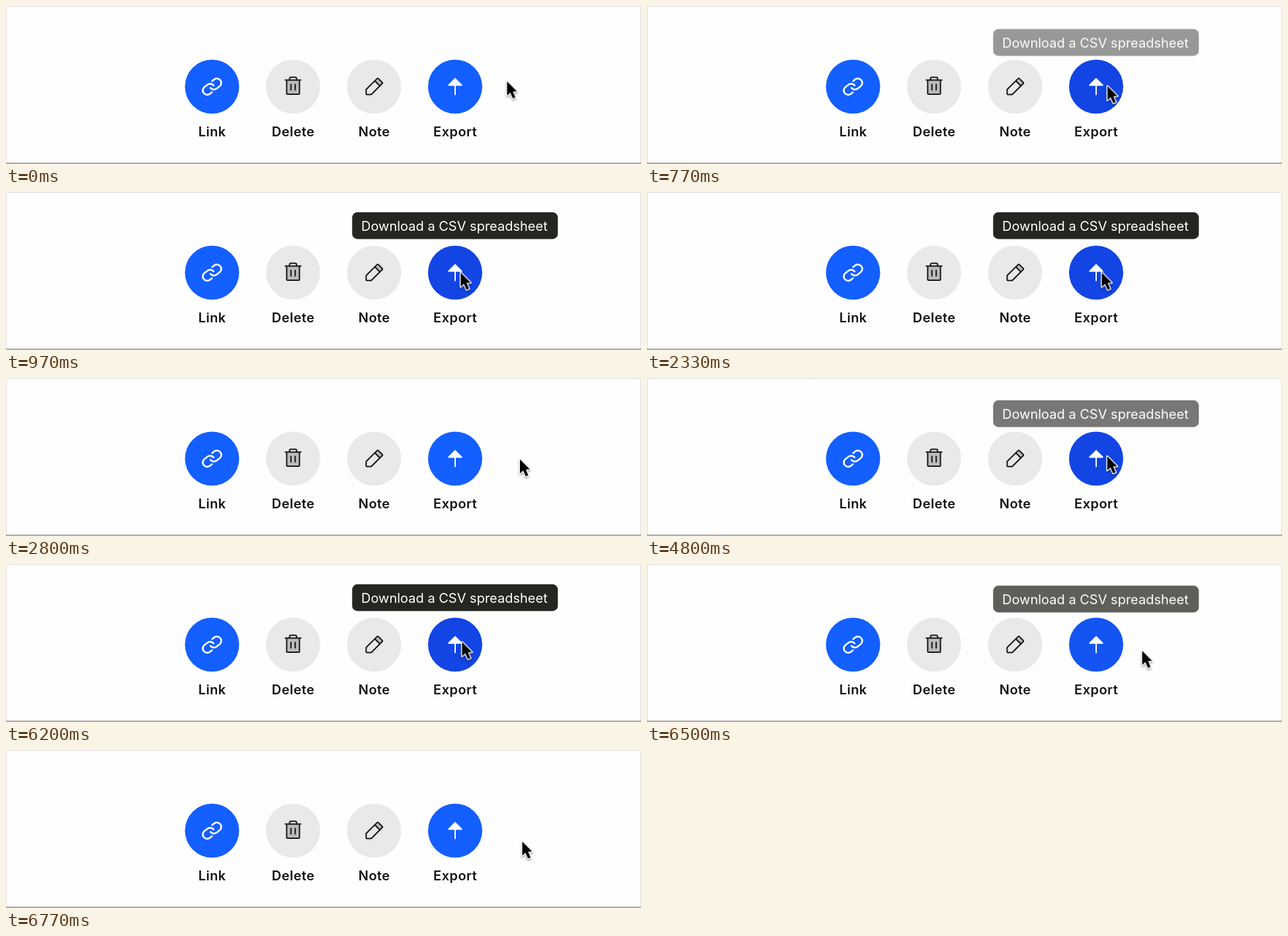
These frames come from a looping animation (960 px wide and 240 px high, 7230 ms). An HTML page:

```html
<!DOCTYPE html>
<html lang="en">
<head>
<meta charset="utf-8">
<title>Export tooltip</title>
<style>
  html, body { margin: 0; width: 100%; height: 100%; overflow: hidden; background: #fefefe; }
  svg { display: block; width: 960px; height: 240px; font-family: Inter, sans-serif; font-size: 20px; }
  .label { font-weight: 600; letter-spacing: .45px; text-anchor: middle; fill: #141414; }
  .primary { fill: #145fff; }
  .plain { fill: #e9e9e8; }
  .icon { fill: none; stroke: #171717; stroke-width: 15; stroke-linecap: round; stroke-linejoin: round; }
  .icon.light { stroke: #fff; }
  .tint { fill: #000; fill-opacity: .2; stroke: none; }
  #tip { opacity: 0; }
  #pointer { filter: drop-shadow(0 2px 1.5px rgba(0, 0, 0, .35)); }
</style>
</head>
<body>
<svg viewBox="0 0 960 240">
  <path d="M.5 240V.5H959.5V240" fill="none" stroke="#dcdcdc"/>
  <rect y="238" width="960" height="1.5" fill="#8e8e8e"/>

  <g transform="translate(311.5 122.5)">
    <circle class="primary" r="41"/>
    <g class="icon light" style="stroke-width:18" transform="rotate(7) scale(.15) translate(-128 -128)">
      <path d="M122.3 71.4l19.8-19.8a44.1 44.1 0 0 1 62.3 62.3l-28.3 28.2a43.9 43.9 0 0 1-62.2 0"/>
      <path d="M133.7 184.6l-19.8 19.8a44.1 44.1 0 0 1-62.3-62.3l28.3-28.2a43.9 43.9 0 0 1 62.2 0"/>
    </g>
    <text class="label" x=".2" y="75.5">Link</text>
  </g>

  <g transform="translate(434 122.5)">
    <circle class="plain" r="41"/>
    <g class="icon" transform="scale(.134) translate(-128 -130)">
      <path class="tint" d="M56 56H200V216H56Z"/>
      <path d="M216 56H40M104 104V168M152 104V168M200 56V208a8 8 0 0 1-8 8H64a8 8 0 0 1-8-8V56"/>
      <path d="M168 56V40a16 16 0 0 0-16-16H104a16 16 0 0 0-16 16V56"/>
    </g>
    <text class="label" x=".2" y="75.5">Delete</text>
  </g>

  <g transform="translate(556.5 122.5)">
    <circle class="plain" r="41"/>
    <g class="icon" transform="scale(.137) translate(-128 -128)">
      <path class="tint" d="M192 120L136 64L168 35L221 88Z"/>
      <path d="M96 216H48a8 8 0 0 1-8-8V163.3a8 8 0 0 1 2.3-5.6l120-120a8 8 0 0 1 11.4 0l44.6 44.6a8 8 0 0 1 0 11.4ZM136 64L192 120"/>
    </g>
    <text class="label" x=".2" y="75.5">Note</text>
  </g>

  <g transform="translate(679 122.5)">
    <circle id="export" class="primary" r="41"/>
    <path d="M0-12L9.7-2.3H-9.7ZM0-3V12" fill="#fff" stroke="#fff" stroke-width="2" stroke-linecap="round" stroke-linejoin="round"/>
    <text class="label" x=".2" y="75.5">Export</text>
  </g>

  <g id="tip">
    <rect x="523.3" y="30.8" width="311" height="40.6" rx="8" fill="#252521"/>
    <text x="537" y="58.7" fill="#fff">Download a CSV spreadsheet</text>
  </g>

  <g id="pointer">
    <path d="M0 0V21.5L4.8 17L8.8 26L12.6 24.3L8.8 15.6L15 15.2Z" fill="#000" stroke="#fff" stroke-width="3" paint-order="stroke" stroke-linejoin="round"/>
  </g>
</svg>
<script>
  const LOOP = 7230;
  const OUT = 'cubic-bezier(.17, .6, .45, 1)';
  const IN_OUT = 'cubic-bezier(.45, 0, .45, 1)';

  // start, end, from, to, easing
  const moves = [
    [545, 965, [757.5, 114.5], [687.5, 122.5], OUT],
    [2320, 2770, [687.5, 122.5], [777, 123.5], IN_OUT],
    [4390, 4925, [776.5, 123.5], [689.5, 118.5], IN_OUT],
    [6190, 6765, [689.5, 118.5], [780.5, 139], IN_OUT]
  ];
  // pointer enters, pointer leaves
  const hovers = [[680, 2535], [4680, 6450]];

  const $ = id => document.getElementById(id);

  function loop(el, frames) {
    el.animate(frames, { duration: LOOP, iterations: Infinity });
  }

  function timeline(steps, style) {
    const frames = steps.map(([time, value, easing = 'linear']) =>
      ({ offset: time / LOOP, easing, ...style(value) }));
    const last = steps[steps.length - 1][1];
    return [{ offset: 0, ...style(steps[0][1]) }, ...frames, { offset: 1, ...style(last) }];
  }

  function fade(duration) {
    return hovers.flatMap(([enter, leave]) => [
      [enter, 0], [enter + duration, 1],
      [leave, 1], [leave + duration, 0]
    ]);
  }

  const path = moves.flatMap(([start, end, from, to, easing]) =>
    [[start, from, easing], [end, to]]);

  loop($('pointer'), timeline(path, ([x, y]) =>
    ({ transform: `translate(${x}px, ${y}px)` })));
  loop($('tip'), timeline(fade(195), p =>
    ({ opacity: p, transform: `translateY(${8 * (1 - p)}px)` })));
  loop($('export'), timeline(fade(90), p =>
    ({ fill: p ? '#1245e4' : '#145fff' })));
</script>
</body>
</html>
```
